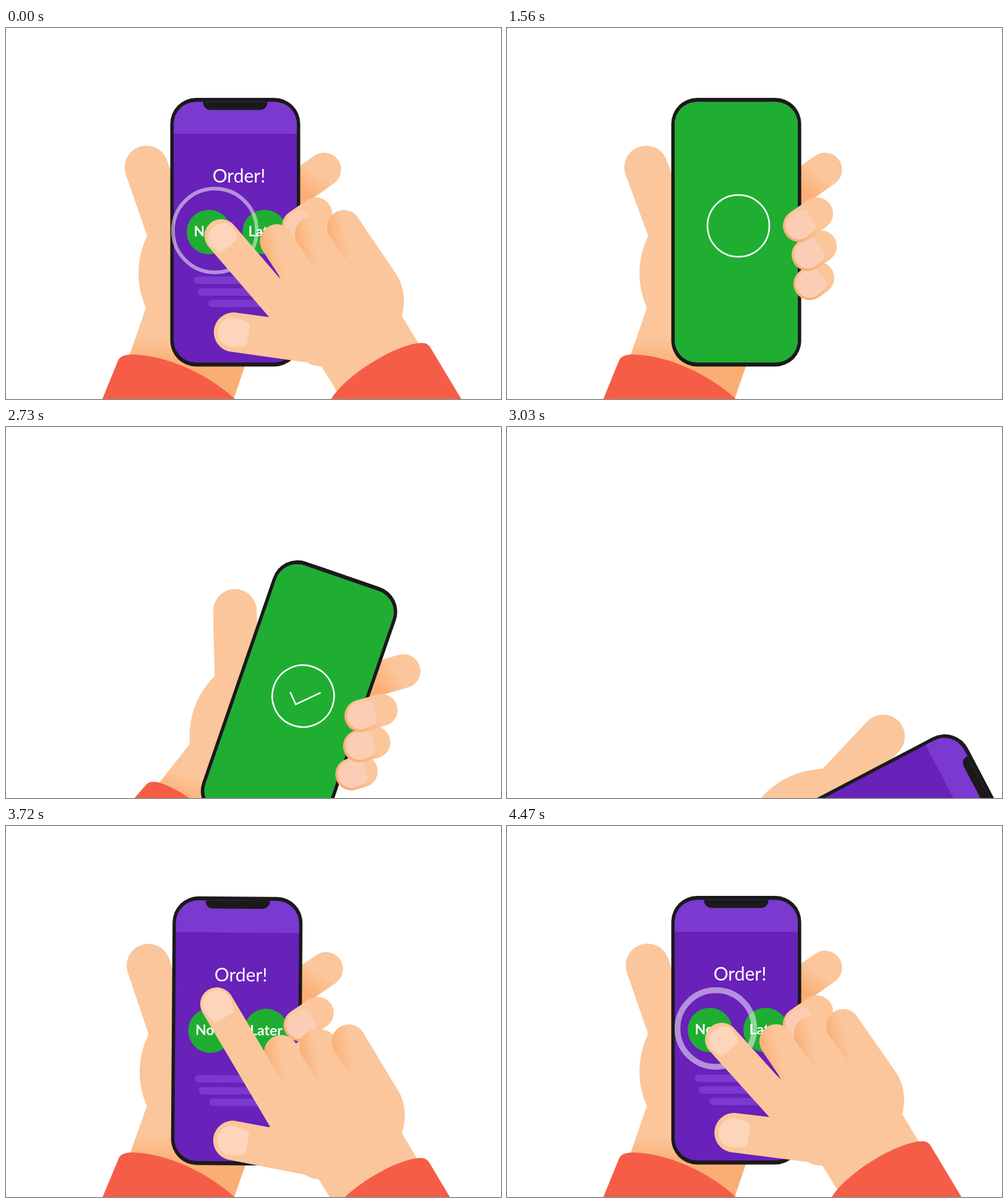
Animation of 800x600 px, one loop 4.5 s. Source, as an HTML page:

```html
<!DOCTYPE html>
<html lang="en">
<head>
<meta charset="utf-8">
<title>Order by phone</title>
<style>
  html, body { margin: 0; width: 100%; height: 100%; overflow: hidden; background: #fff; }
  svg { display: block; width: 100vw; height: 100vh; }
  text { font-family: Lato, sans-serif; fill: #fff; text-anchor: middle; }
  .skin { fill: #fbc69b; }
  .cuff { fill: #f55d47; }
  .line { fill: none; stroke: #fff; stroke-width: 2.5; }
</style>
</head>
<body>
<svg viewBox="0 0 800 600">
  <defs>
    <linearGradient id="wrist" gradientUnits="userSpaceOnUse" x1="0" y1="500" x2="0" y2="546">
      <stop stop-color="#fbc69b"/><stop offset="1" stop-color="#fbae74"/>
    </linearGradient>
    <linearGradient id="pointer" gradientUnits="userSpaceOnUse" x1="482" y1="268" x2="505" y2="236">
      <stop stop-color="#fbae74"/><stop offset="1" stop-color="#fbc69b"/>
    </linearGradient>
    <linearGradient id="under" gradientUnits="userSpaceOnUse" x1="2" y1="24" x2="18" y2="-8">
      <stop stop-color="#fbae74"/><stop offset="1" stop-color="#fbc69b"/>
    </linearGradient>
    <linearGradient id="knuckle" x1=".05" y1=".45" x2=".53" y2=".25">
      <stop stop-color="#fbae74"/><stop offset="1" stop-color="#fbc69b"/>
    </linearGradient>
    <clipPath id="screen"><rect x="271" y="119.5" width="199" height="421.5" rx="36"/></clipPath>
    <path id="nail" d="M0 -22A22 22 0 0 0 0 22L15 20Q24 19 24 11V-11Q24 -19 15 -20Z"/>
  </defs>

  <g id="holder">
    <path class="skin" id="thumb" d="M228 336L194 238A35 35 0 0 1 260 213L300 330V380H228Z"/>
    <path fill="url(#wrist)" d="M228 336Q201 394 226 453L200 528L160 640L345 668L386 547L400 400L300 330Z"/>
    <path class="cuff" d="M181 538Q185 528 203 528C262 529 330 562 372 602L440 690H119Z"/>
    <path stroke="url(#pointer)" stroke-width="55" stroke-linecap="round" d="M514 229L440 281"/>
    <rect x="265.5" y="113" width="210" height="434.5" rx="42" fill="#1a1a1a"/>
    <g clip-path="url(#screen)">
      <path fill="#6821b9" d="M260 110H480V550H260Z"/>
      <path fill="#7b39cf" d="M260 110H480V171H260Z"/>
      <rect x="318.5" y="100" width="104" height="32.5" rx="12" fill="#1a1a1a"/>
      <text x="376.5" y="250" font-size="30">Order!</text>
      <g fill="#1fae32"><circle cx="328" cy="330" r="36"/><circle cx="418" cy="330" r="36"/></g>
      <g font-size="23" font-weight="700"><text x="328" y="337">Now</text><text x="418" y="337">Later</text></g>
      <g fill="#7b39cf">
        <rect x="303.5" y="402" width="136" height="12" rx="6"/>
        <rect x="309.5" y="421" width="124" height="12" rx="6"/>
        <rect x="327" y="439.5" width="88" height="12" rx="6"/>
      </g>
      <circle id="flood" cx="328" cy="330" fill="#1fae32"/>
    </g>
    <g id="status" class="line">
      <circle cx="374" cy="320" r="50" opacity=".2"/>
      <circle id="progress" cx="374" cy="320" r="50" pathLength="1" transform="rotate(-90 374 320)"/>
      <path id="check" pathLength="1" d="M352 320.5L367 336.5L399 305.5"/>
    </g>
    <g id="fingers"></g>
  </g>

  <circle id="ripple" cx="337.5" cy="327.5" fill="none" stroke="#fff" stroke-opacity=".5"/>

  <path class="skin" id="forearm" d="M500 531L640 466L730 615L550 613Z"/>
  <g id="hand">
    <path class="skin" d="M425 467.500L369 460A32 32 0 0 0 360 523L487 541Q498 548 512 547L560 560L640 466C646 440 643 418 632 400L569 307A27 27 0 0 0 523 337L517 318A27 27 0 0 0 471 348L461 330A27 27 0 0 0 415 360L441 400L456 440Z"/>
    <g fill="url(#knuckle)">
      <path d="M415 360A27 27 0 0 1 461 330L448 410Z"/>
      <path d="M471 348A27 27 0 0 1 517 318L511 406Z"/>
      <path d="M523 337A27 27 0 0 1 569 307L561 390Z"/>
    </g>
    <path id="index" stroke="#fbc69b" stroke-width="54" stroke-linecap="round"/>
    <g fill="#fdd5ba">
      <use href="#nail" transform="translate(366 492) rotate(8) scale(1.08)"/>
      <use href="#nail" id="indexNail"/>
    </g>
  </g>
  <path class="cuff" id="cuff" d="M525 601C550 560 630 512 669 509.500Q681 508 686 517L737 602L800 710H470Z"/>
</svg>
<script>
const LOOP = 4500;
const $ = id => document.getElementById(id);
const set = (id, attrs) => { for (const k in attrs) $(id).setAttribute(k, attrs[k]); };
const clamp = v => Math.max(0, Math.min(1, v));
const ramp = (t, a, b) => clamp((t - a) / (b - a));
const smooth = (t, a, b) => { const u = ramp(t, a, b); return u * u * (3 - 2 * u); };

// Rows are [time, ...values]; interpolated by monotone cubics.
function pose(keys, t) {
  let i = keys.findIndex(k => k[0] > t) - 1;
  if (i === -1) return keys[0].slice(1);
  if (i < 0) return keys[keys.length - 1].slice(1);
  const span = keys[i + 1][0] - keys[i][0], u = (t - keys[i][0]) / span;
  return keys[i].slice(1).map((v, n) => {
    const col = n + 1;
    const slope = j => (keys[j + 1][col] - keys[j][col]) / (keys[j + 1][0] - keys[j][0]);
    const tangent = j => {
      if (j === 0 || j === keys.length - 1) return 0;
      const a = slope(j - 1), b = slope(j);
      return a * b > 0 ? 2 * a * b / (a + b) : 0;
    };
    const end = keys[i + 1][col], w = 1 - u;
    return v * w * w * (1 + 2 * u) + end * u * u * (3 - 2 * u)
      + span * (tangent(i) * u * w * w - tangent(i + 1) * u * u * w);
  });
}

// angle, drop
const HOLDER = [
  [2190, 0, 0], [2580, -1.7, 1.8], [2700, 8, 37], [2880, 110, 30], [3030, 62.6, 3.5],
  [3240, 14, 12], [3330, 4.93, 9], [3480, -4, 0], [3650, .7, 0], [3860, -.4, 0], [4060, 0, 0]
];
// angle
const THUMB = [[0, 0], [480, -2.1], [690, -1.2], [2880, -1.2], [3000, 0]];
// x, y, angle, index length, index angle
const HAND = [
  [0, 0, 0, 0, 166, 49.3], [250, 3, 6, .6, 206, 54], [690, 70, 159.5, 10.4, 216, 55.4],
  [1000, 85, 500, 22, 216, 55.4], [3380, 70, 500, 18, 227, 56.3], [3720, 0, 31.5, 3.1, 227, 56.3],
  [3960, 0, 0, 0, 227, 56], [4100, 0, 0, 0, 227, 56], [4330, -1.5, 1, -1, 158, 48.4],
  [4470, -1, .5, -.75, 161, 48.7], [LOOP, 0, 0, 0, 166, 49.3]
];

const finger = (x, y, dx, dy) => `<g transform="translate(${x} ${y})">
  <path stroke="url(#under)" stroke-width="52" stroke-linecap="round" d="M0 0L${dx} ${dy}"/>
  <use href="#nail" fill="#fbcdb5" transform="rotate(-33)"/></g>`;
$('fingers').innerHTML = finger(489, 414, 14, -10) + finger(486, 367, 21, -14) + finger(472, 320, 29, -20);

function drawHolder(t) {
  const [angle, drop] = pose(HOLDER, t);
  set('holder', { transform: `translate(0 ${drop}) rotate(${angle} 193 676)` });
  set('thumb', { transform: `rotate(${pose(THUMB, t)[0]} 228 330)` });

  const ordered = t > 240 && t < 2880;
  set('flood', { r: ordered ? 36 + 264 * ramp(t, 240, 620) ** 2 : 0 });
  set('status', { opacity: ordered ? ramp(t, 600, 680) : 0 });
  set('progress', { 'stroke-dasharray': `${smooth(t, 645, 1510)} 2` });
  set('check', { 'stroke-dasharray': `${smooth(t, 1640, 1980)} 2` });
}

function drawRipple(t) {
  const age = (t < 300 ? t + LOOP : t) - 4470;
  const r = Math.max(0, 61.75 + age * .192);
  set('ripple', { r, 'stroke-width': Math.max(0, Math.min(14, r, 9.5 - age * .117)) });
}

function drawHand(t) {
  const [x, y, angle, length, bend] = pose(HAND, t);
  const rad = bend * Math.PI / 180;
  const tipX = 456 - length * Math.cos(rad), tipY = 462 - length * Math.sin(rad);
  const shift = `translate(${x} ${y})`;
  set('forearm', { transform: shift });
  set('cuff', { transform: `translate(${x - y * .06} ${y * .88})` });
  set('hand', { transform: `${shift} rotate(${angle} 640 466)` });
  set('index', { d: `M${tipX} ${tipY}L456 462` });
  set('indexNail', {
    transform: `translate(${tipX} ${tipY}) rotate(${bend}) scale(${1.05 - (227 - length) * .003} 1.05)`
  });
}

function frame() {
  const t = performance.now() % LOOP;
  drawHolder(t);
  drawRipple(t);
  drawHand(t);
  requestAnimationFrame(frame);
}
frame();
</script>
</body>
</html>
```
